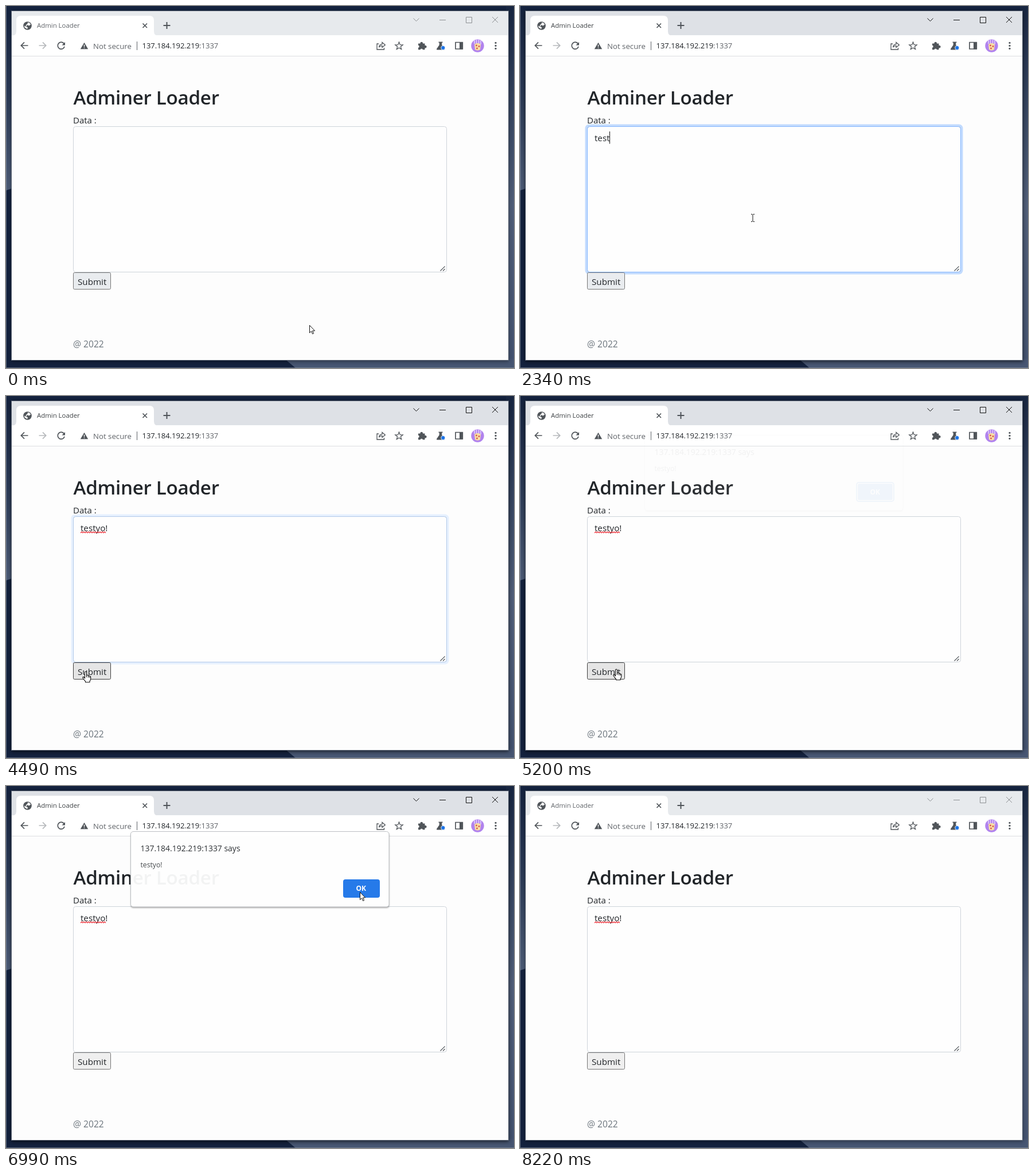
An HTML page that plays this animation: 886 by 632 pixels, repeating every 8320 ms.

```html
<!DOCTYPE html>
<html lang="en">
<head>
<meta charset="utf-8">
<title>Admin Loader</title>
<style>
  html, body { margin: 0; width: 100%; height: 100%; overflow: hidden; background: #16233d; }
  svg { display: block; width: 886px; height: 632px; font-family: "Open Sans", "Noto Sans", sans-serif; }
  text { fill: #212529; font-size: 15.2px; white-space: pre; }
  .line { fill: none; stroke: #50555a; stroke-width: 1.7; }
  .thin { fill: none; stroke: #50555a; stroke-width: 1.3; }
  .icon { fill: #50555a; }
</style>
</head>
<body>
<svg viewBox="0 0 886 632">
  <defs>
    <linearGradient id="leftSky" x2="0" y2="1">
      <stop offset="0" stop-color="#14223e"/><stop offset=".5" stop-color="#2c3b57"/><stop offset="1" stop-color="#4c5b76"/>
    </linearGradient>
    <linearGradient id="rightSky" x2="0" y2="1">
      <stop offset="0" stop-color="#182641"/><stop offset=".25" stop-color="#33425d"/>
      <stop offset=".55" stop-color="#505e78"/><stop offset="1" stop-color="#43526f"/>
    </linearGradient>
    <filter id="soft" x="-10%" y="-10%" width="120%" height="120%"><feGaussianBlur stdDeviation="3"/></filter>
    <filter id="drop" x="-10%" y="-10%" width="120%" height="130%"><feGaussianBlur stdDeviation="1.5"/></filter>
  </defs>

  <!-- desktop -->
  <rect width="886" height="632" fill="#14223e"/>
  <rect width="12" height="322" fill="url(#leftSky)"/>
  <path d="M0 322L12 318V330H0Z" fill="#14223e"/>
  <rect x="872" width="14" height="632" fill="url(#rightSky)"/>
  <path d="M486 616H886V632H505Z" fill="#475672"/>
  <path d="M.5 0V631.5H886" fill="none" stroke="#8b94a3" stroke-opacity=".6"/>
  <rect id="shadow" x="9" y="10" width="868" height="611" fill="#000" filter="url(#soft)"/>

  <!-- browser window -->
  <rect x="9" y="8" width="868" height="611" fill="#5b6473"/>
  <rect id="strip" x="10" y="9" width="866" height="43"/>
  <rect x="10" y="51" width="866" height="37" fill="#fff"/>
  <path d="M10 52Q18 52 18 44V25Q18 17 26 17H250Q258 17 258 25V44Q258 52 266 52Z" fill="#fff"/>
  <rect x="10" y="88" width="866" height="530" fill="#fdfdfd"/>
  <path d="M10 87.5H876" stroke="#dcdee1"/>

  <circle class="icon" cx="37.5" cy="34.5" r="7.3"/>
  <path d="M38 28.8Q42 29 43 32.5L40 34.5L37.5 33L35 35.5L38 37.5L37 40.2L32.5 37.5L32 34.2L34.5 36L35 33L37.5 31Z" fill="#fff"/>
  <text id="tab" x="54" y="38.3" style="font-size:11.4px">Admin Loader</text>
  <path class="line" d="M238.5 30.5L246 38M246 30.5L238.5 38" stroke-width="1.5"/>
  <path class="line" d="M274.5 34H286.5M280.5 28V40" style="stroke-width:2"/>
  <path id="controls" fill="none" d="M710.5 21.5L715.5 26.5L720.5 21.5M756 24.5H767M802.5 19.5H812.5V29.5H802.5ZM848 19L858 29M858 19L848 29"/>

  <path class="line" d="M38.5 69H26.5M32 63.3L26.3 69L32 74.7"/>
  <path class="line" d="M57.5 69H69.5M64 63.3L69.7 69L64 74.7" style="stroke:#b6b9bc"/>
  <path class="line" d="M101.2 65.8A6 6 0 1 0 102 70.8"/>
  <path class="icon" d="M103 63V68.6H97.4Z"/>
  <path class="icon" d="M136.5 63.8L143.2 75.3H129.8Z"/>
  <path d="M136.5 67.5V71.3M136.5 72.4V73.7" stroke="#fff" stroke-width="1.4"/>
  <text x="152" y="74.5" style="font-size:13.25px;fill:#5f6368">Not secure</text>
  <path d="M228.5 62V77" stroke="#5f6368"/>
  <text x="237.5" y="74.2" style="font-size:13px">137.184.192.219<tspan fill="#5f6368">:1337</tspan></text>

  <path class="thin" d="M650 66H647V76H659.5V73M650.5 72Q651.5 67 656 66.7V63.5L661.3 68L656 72.3V69.4Q652.5 69.3 650.5 72Z"/>
  <path id="star" class="thin"/>
  <path class="icon" d="M719 65.5H722.5A2.3 2.3 0 1 1 727 65.5H730.5V69A2.3 2.3 0 1 1 730.5 73.3V76.3H727A2.3 2.3 0 0 0 722.5 76.3H719V72.8A2.2 2.2 0 0 0 719 68.5Z"/>
  <path class="icon" d="M754.5 62.5H761.5V64H760.3V68L765 75Q765.3 76.5 764 76.5H752Q750.7 76.5 751 75L755.7 68V64H754.5Z"/>
  <circle cx="762.3" cy="73" r="3.6" fill="#1a73e8" stroke="#fff" stroke-width=".8"/>
  <path class="line" d="M784 63.5H796.3V75H784Z"/>
  <path class="icon" d="M791 63H797V75.5H791Z"/>
  <circle cx="822.5" cy="69.5" r="11.2" fill="#b183ee"/>
  <path d="M817 60V66M820.5 59V65M824.5 59V65M828 60V67" stroke="#e3d2fb" stroke-width="1.6"/>
  <path d="M817 67Q822.5 62.5 828 67L827 76Q822.5 79 818 76Z" fill="#f8dfa2"/>
  <g fill="#d8544f"><circle cx="820.5" cy="69" r="1.4"/><circle cx="825" cy="70.5" r="1.4"/><circle cx="821.5" cy="74" r="1.4"/></g>
  <g class="icon"><circle cx="854" cy="64.3" r="1.6"/><circle cx="854" cy="69.3" r="1.6"/><circle cx="854" cy="74.3" r="1.6"/></g>

  <!-- page -->
  <text x="117.5" y="171.5" style="font-size:33.2px;font-weight:600;letter-spacing:-.3px">Adminer Loader</text>
  <text x="117" y="204.5" style="font-size:15px">Data :</text>
  <rect id="ring" x="113.5" y="206.5" width="659" height="262" rx="7" fill="#c2dbfe"/>
  <rect x="117.5" y="210.5" width="651" height="254" rx="4" fill="#fefefe" stroke="#ced4da"/>
  <rect id="edge" x="117.5" y="210.5" width="651" height="254" rx="4" fill="none" stroke="#86b7fe"/>
  <path d="M757.5 462.5L765.5 454.5M762 462.5L765.5 459" stroke="#50555a" stroke-width="1.2"/>
  <text id="typed" x="130" y="236"></text>
  <path id="wave" fill="none" stroke="#e8202a" stroke-width="1.1"/>
  <path id="caret" d="M0 219V240.5" stroke="#111"/>
  <rect id="button" x="117.5" y="465.5" width="65" height="29" rx="2"/>
  <text x="125" y="486.8">Submit</text>
  <text x="117" y="595.7" style="font-size:15.6px;fill:#6c757d">@ 2022</text>

  <!-- dialog -->
  <g id="dialog">
    <rect x="218" y="86" width="450" height="130.5" rx="4" fill="#000" opacity=".45" filter="url(#drop)"/>
    <rect x="217.5" y="83.5" width="450.5" height="131.5" rx="4.5" fill="#fff" stroke="#b9bcc0"/>
    <text x="234.5" y="117.7" style="font-size:13.95px">137.184.192.219:1337 says</text>
    <text x="234.5" y="146" style="font-size:12.2px;fill:#3c4043">testyo!</text>
    <rect x="588" y="167" width="64" height="32" rx="4" fill="#1a73e8"/>
    <g id="focus" fill="none">
      <rect x="588.5" y="167.5" width="62" height="30" rx="3" stroke="#fff" stroke-width="1.4"/>
      <rect x="587" y="166" width="65" height="33" rx="4" stroke="#1a73e8" stroke-width="1.8"/>
    </g>
    <text x="619.2" y="187" text-anchor="middle" style="font-size:12px;font-weight:700;fill:#fff">OK</text>
  </g>

  <!-- pointers, hot spot at 0,0 -->
  <g id="pointer" stroke="#111" stroke-linejoin="round">
    <path id="arrow" fill="#fff" d="M.5 .5V13.6L3.5 10.8L5.6 15.5L7.6 14.6L5.5 10H9.6Z"/>
    <path id="beam" fill="none" d="M-3 -6.5H-1L0 -5.5L1 -6.5H3M0 -5.5V5.5M-3 6.5H-1L0 5.5L1 6.5H3"/>
    <path id="hand" fill="#fff" stroke-width="1.1" d="M-1.5 12V1.5Q-1.5 0 0 0T1.5 1.5V6.5Q4 5.6 4.5 7.4Q6.6 6.6 7 8.2Q8.6 8 8.7 9.6V13Q8.5 15.5 7 17V18.7H-.5V17.2Q-3 14.5-5 11.2Q-5.5 9.5-4 9.4Q-2.7 9.6-1.5 12ZM1.5 6.5V10M4.5 7.4V10.5M7 8.2V11"/>
  </g>
</svg>
<script>
const LOOP = 8320;
const $ = id => document.getElementById(id);
const clamp = v => Math.min(1, Math.max(0, v));
const span = (t, a, b) => clamp((t - a) / (b - a));
const smooth = u => u * u * (3 - 2 * u);
const show = (id, on) => $(id).setAttribute('visibility', on ? 'visible' : 'hidden');
const set = (id, attrs) => { for (const k in attrs) $(id).setAttribute(k, attrs[k]); };

// key presses: time, text so far
const keys = [[1880, 't'], [1950, 'te'], [2090, 'tes'], [2340, 'test'],
              [2720, 'testy'], [2780, 'testyo'], [3310, 'testyo!']];
const FOCUS = 1060, BLUR = 4400, HOVER_END = 6900, LEAVE = 8190;

// pointer moves: start, end, bend point, target
const moves = [
  [560, 1040, 480, 430, 406, 370],
  [3740, 4010, 385, 445, 149, 459],
  [4010, 4130, 142, 468, 139, 481],
  [4730, 5170, 152, 484, 168, 477],
  [5210, 5560, 280, 470, 417, 421],
  [5590, 5660, 425, 416, 434, 408],
  [5660, 6280, 545, 300, 607, 186],
  [6610, 6680, 612, 180, 617, 185],
  [7020, 7720, 690, 380, 806, 640]
];

function pointerAt(t) {
  let x = 529, y = 557;
  for (const [a, b, cx, cy, ex, ey] of moves) {
    if (t < a) break;
    const u = smooth(span(t, a, b)), v = 1 - u;
    x = v * v * x + 2 * u * v * cx + u * u * ex;
    y = v * v * y + 2 * u * v * cy + u * u * ey;
  }
  return [Math.round(x), Math.round(y)];
}

function pointerShape(t, x, y) {
  if (t > 5180 && t < 7000) return y > 215 ? 'hand' : 'arrow';
  const inside = (l, top, r, b) => x > l && x < r && y > top && y < b;
  if (inside(117, 210, 769, 464)) return 'beam';
  return inside(117, 464, 183, 495) ? 'hand' : 'arrow';
}

function drawWindow(t) {
  const active = t >= FOCUS && t < LEAVE;
  set('strip', { fill: active ? '#dee1e6' : '#e7eaed' });
  set('controls', { stroke: active ? '#111' : '#8d9093' });
  set('shadow', { opacity: active ? .6 : .35 });
  $('tab').style.fill = active ? '#3c4043' : '#5f6368';
}

function drawForm(t) {
  const ring = span(t, FOCUS, FOCUS + 150) - span(t, BLUR, BLUR + 150);
  set('ring', { opacity: ring });
  set('edge', { opacity: ring });

  let text = '', since = FOCUS;
  for (const [at, s] of keys) if (t >= at) { text = s; since = at; }
  if ($('typed').textContent !== text) $('typed').textContent = text;
  const width = text ? $('typed').getComputedTextLength() : 0;
  const lit = t - since < 410 || (t - since - 410) % 1000 >= 500;
  set('caret', { transform: `translate(${Math.floor(130 + width) + .5} 0)` });
  show('caret', t >= FOCUS && t < BLUR && lit);
  show('wave', t >= BLUR);

  const hover = t >= 4060 && t < HOVER_END;
  set('button', {
    fill: hover ? '#e5e5e5' : t < 4060 ? '#e9ecef' : '#efefef',
    stroke: hover ? '#3f3f3f' : '#767676'
  });
}

function drawDialog(t) {
  const open = span(t, 5190, 5400), close = span(t, 6955, 7110);
  const lift = 17 * ((1 - open) ** 2 + close);
  set('dialog', { opacity: open * (1 - close * close), transform: `translate(0 ${-Math.round(lift)})` });
  show('dialog', open > 0 && close < 1);
  set('focus', { opacity: t < HOVER_END ? 1 : 0 });
}

function drawPointer(t) {
  const [x, y] = pointerAt(t), shape = pointerShape(t, x, y);
  set('pointer', { transform: `translate(${x} ${y})` });
  for (const id of ['arrow', 'beam', 'hand']) show(id, id === shape);
}

let star = '';
for (let i = 0; i < 10; i++) {
  const r = i % 2 ? 3 : 7, a = i * Math.PI / 5;
  star += `${i ? 'L' : 'M'}${685.5 + r * Math.sin(a)} ${70 - r * Math.cos(a)}`;
}
set('star', { d: star + 'Z' });

let wave = 'M130 239';
for (let x = 132; x < 175; x += 2) wave += `L${x} ${x % 4 ? 239 : 237}`;
set('wave', { d: wave });

const start = performance.now();
function frame() {
  const t = (performance.now() - start) % LOOP;
  drawWindow(t);
  drawForm(t);
  drawDialog(t);
  drawPointer(t);
  requestAnimationFrame(frame);
}
frame();
</script>
</body>
</html>
```
